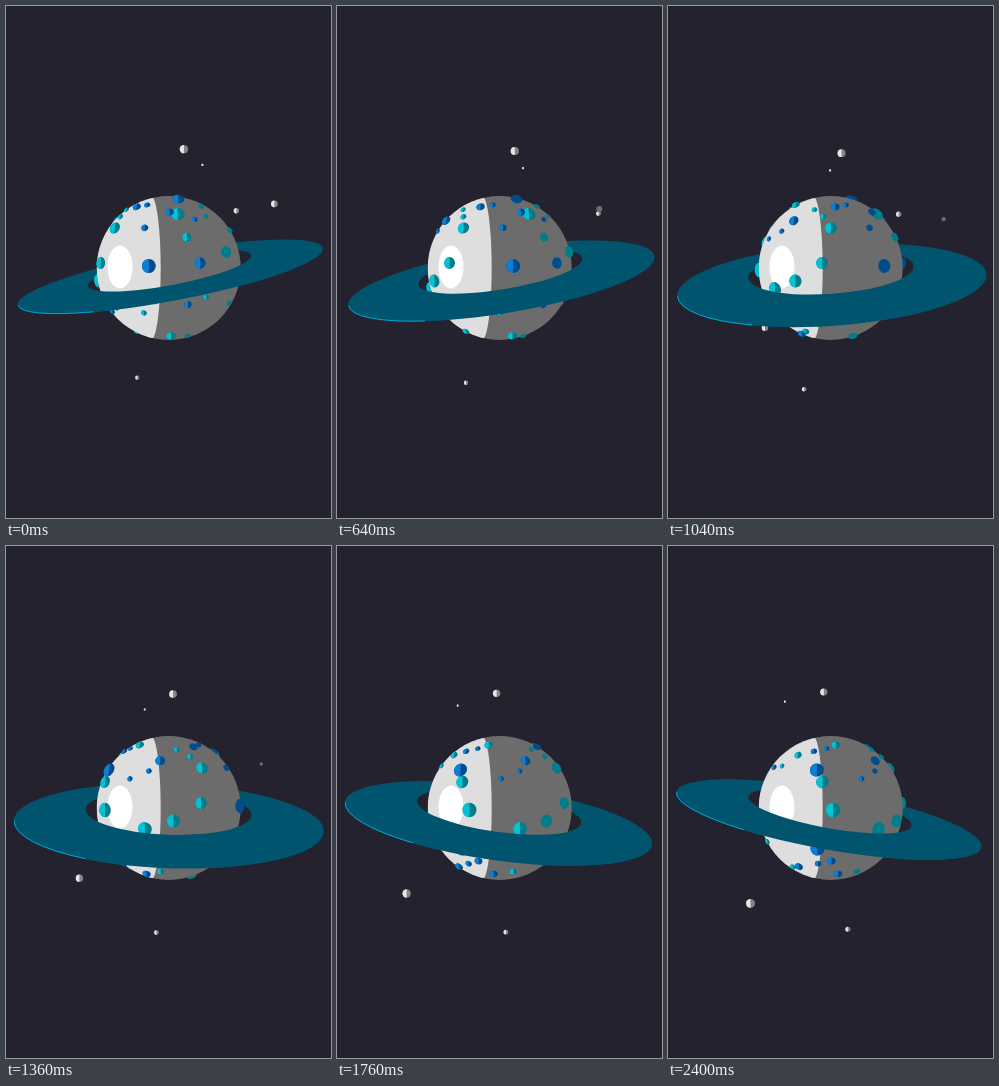
An HTML page with a canvas for the animation above (2440 ms loop, 325 by 512 pixels).

```html
<!DOCTYPE html>
<html lang="en">
<head>
<meta charset="utf-8">
<title>Ringed planet</title>
<style>
  html, body { margin: 0; width: 100%; height: 100%; overflow: hidden; background: #24222e; }
  canvas { display: block; width: 325px; height: 512px; }
</style>
</head>
<body>
<canvas id="stage" width="325" height="512"></canvas>
<script>
const ctx = document.getElementById('stage').getContext('2d');
const LOOP = 2440, STEP = 40, TURN = 162, TAU = Math.PI * 2;
const rad = deg => deg * Math.PI / 180;
const cos = deg => Math.cos(rad(deg));
const sin = deg => Math.sin(rad(deg));

const planet = { x: 162.7, y: 262, r: 72 };
const cyan = { light: '#00c3d6', dark: '#007d89' };
const blue = { light: '#0a7fd6', dark: '#004d8e' };

// Orbits: centre, signed radii, phase in degrees; size grows by `grow`
const moons = [
  { x: 166.2, y: 144, rx: 12, ry: 4, phase: -12, size: 4.2, grow: -0.6 },
  { x: 158, y: 156, rx: 41, ry: 8.5, phase: 20, size: 1.1, grow: 0 },
  { x: 182, y: 212.4, rx: 94, ry: 9, phase: -59, size: 2.7, grow: -1.5, shaded: true },
  { x: 195.5, y: 198.5, rx: 73, ry: 11, phase: -3, size: 3.3, grow: -1.7, shaded: true },
  { x: 158, y: 376, rx: 29, ry: -11, phase: 157, size: 2.1, grow: 0.4 },
  { x: 130, y: 342, rx: 62, ry: -24, phase: 58, size: 2.4, grow: 2.1 }
];

function randomFrom(seed) {
  return () => (seed = seed * 16807 % 2147483647) / 2147483647;
}

const bump = (lon, y, r, tone) => ({ lon, y, r, tone });

// Large bumps are placed, the small ones scattered towards both poles
const bumps = [
  bump(11, 208, 7, cyan), bump(55, 246, 6, cyan), bump(-64, 222, 6, cyan),
  bump(-71, 257, 6, cyan), bump(-94, 275, 6.5, cyan), bump(-118, 283, 7, cyan),
  bump(-169, 236, 6.3, cyan), bump(-160, 264, 7.3, cyan),
  bump(28, 193, 6, blue), bump(-16, 260, 7, blue), bump(26, 257, 5.7, blue),
  bump(-175, 224, 7, blue), bump(-175, 303, 7, blue)
];
const random = randomFrom(2024);
const SMALL = 40;
for (let i = 0; i < SMALL; i++) {
  const lon = 85 - 335 * (i + random()) / SMALL;
  const side = i % 2 ? 1 : -1;
  const y = planet.y + side * (28 + 41 * random());
  const r = 2.5 + 2.5 * random();
  bumps.push(bump(lon, y, r, random() < 0.5 ? cyan : blue));
}

function oval(x, y, rx, ry, color, tilt = 0, from = 0, to = TAU) {
  ctx.beginPath();
  ctx.ellipse(x, y, rx, ry, tilt, from, to);
  ctx.fillStyle = color;
  ctx.fill();
}

// Oval whose left half is lit
function litOval(x, y, rx, ry, dark, light, tilt = 0) {
  oval(x, y, rx, ry, dark, tilt);
  if (light) oval(x, y, rx, ry, light, tilt, Math.PI / 2 - tilt, Math.PI * 1.5 - tilt);
}

function drawMoon(m, turn) {
  const a = turn + m.phase;
  const x = m.x + m.rx * cos(a), y = m.y + m.ry * sin(a);
  const size = m.size + m.grow * turn / TURN;
  if (m.shaded && a > 4.6 && a < 50) oval(x, y, size, size, '#6c6c6c');
  else litOval(x, y, size, size, size < 1.3 ? '#d0d0d0' : '#858585', '#e6e6e6');
}

function drawBumps(turn, front) {
  for (const { lon, y, r, tone } of bumps) {
    const a = lon + turn, depth = cos(a);
    if (Math.abs(a) > 115 || (depth > 0) !== front) continue;
    const dy = y - planet.y;
    const girth = Math.sqrt(planet.r ** 2 - dy * dy);
    const dx = girth * sin(a);
    const squash = 0.6 + 0.4 * Math.max(depth * girth / planet.r, 0);
    litOval(planet.x + dx, y, r * squash, r, tone.dark, a < 40 && tone.light, Math.atan2(dy, dx));
  }
}

function drawPlanet() {
  const { x, y, r } = planet;
  oval(x, y, r, r, '#6c6c6c');
  ctx.save();
  ctx.beginPath();
  ctx.arc(x, y, r, 0, TAU);
  ctx.clip();
  ctx.fillStyle = '#dedede';
  ctx.fillRect(x - r, y - r, 145 - x + r, r * 2);
  oval(145, y, 9.7, r, '#dedede');
  ctx.restore();
  oval(114, 261, 12.5, 21.5, '#fff');
}

function drawRing(turn, front) {
  const open = sin(turn), tilt = rad(-10.6 * cos(turn + 3));
  const ox = 162.4 + 2 * cos(turn - 20), oy = 270.7 + 9.5 * open;
  const rx = 155, ry = 24.3 + 18 * open;
  const hx = 162.7 + 0.8 * cos(turn), hy = 264.7 + 1.6 * open, hr = 83;
  ctx.save();
  if (front) {
    ctx.translate(hx, hy);
    ctx.rotate(tilt);
    ctx.beginPath();
    ctx.rect(-200, 0, 400, 120);
    ctx.clip();
    ctx.rotate(-tilt);
    ctx.translate(-hx, -hy);
  }
  ctx.beginPath();
  ctx.ellipse(ox, oy, rx, ry, tilt, 0, TAU);
  ctx.closePath();
  ctx.moveTo(hx + hr * Math.cos(tilt), hy + hr * Math.sin(tilt));
  ctx.ellipse(hx, hy, hr, 14.5 + 8 * open, tilt, 0, TAU);
  ctx.fillStyle = '#00546d';
  ctx.fill('evenodd');
  ctx.restore();
  if (front) {
    ctx.beginPath();
    ctx.ellipse(ox, oy, rx - 0.3, ry - 0.3, tilt, rad(122), Math.PI);
    ctx.strokeStyle = '#00a6d6';
    ctx.lineWidth = 1;
    ctx.stroke();
  }
}

function draw(time) {
  const turn = TURN * (1 - Math.cos(Math.PI * time / (LOOP - STEP))) / 2;
  ctx.fillStyle = '#24222e';
  ctx.fillRect(0, 0, 325, 512);
  moons.forEach(m => drawMoon(m, turn));
  drawRing(turn, false);
  drawBumps(turn, false);
  drawPlanet();
  drawBumps(turn, true);
  drawRing(turn, true);
}

const start = performance.now();
function tick() {
  const t = (performance.now() - start) % LOOP;
  draw(Math.floor(t / STEP) * STEP);
  requestAnimationFrame(tick);
}
tick();
</script>
</body>
</html>
```
